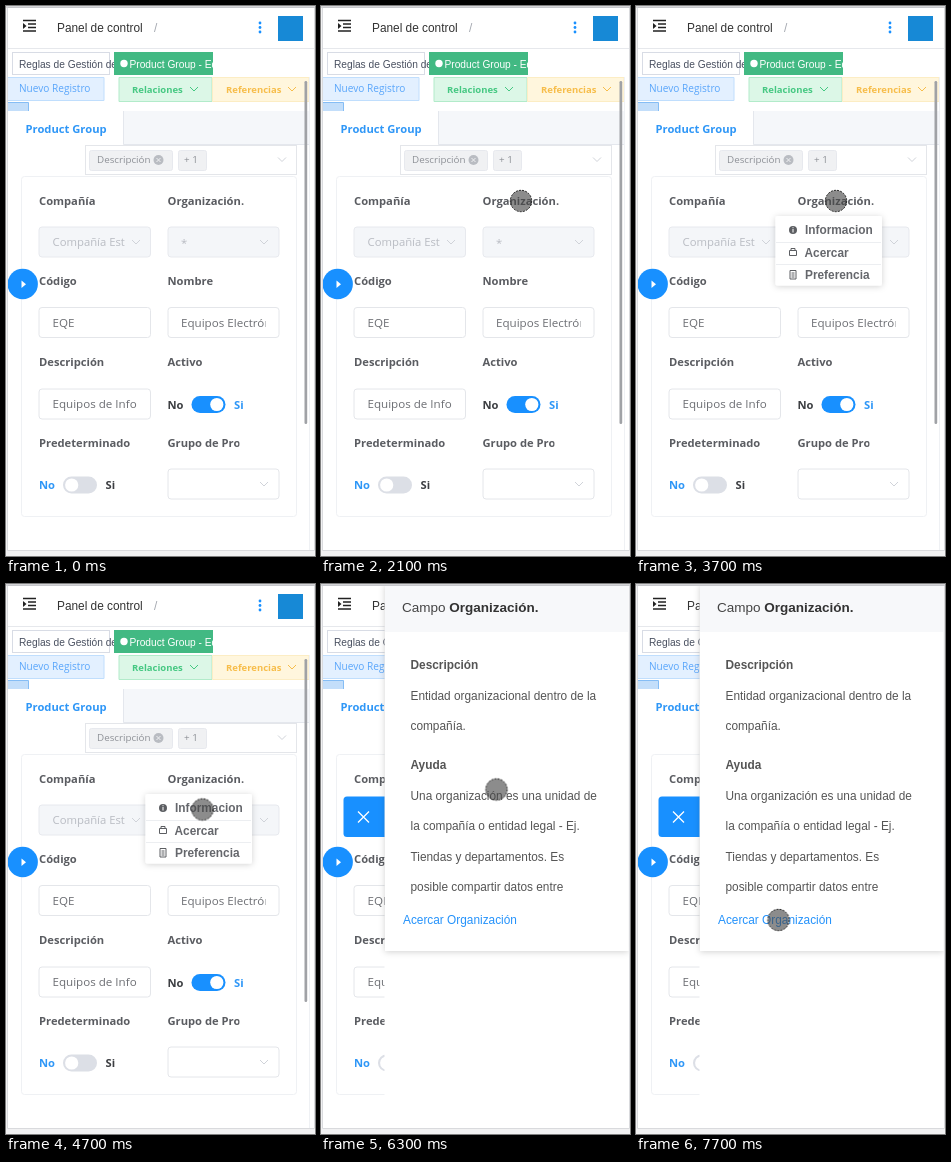
Recreate the animation shown at these times as an HTML page. Size 309 px wide and 550 px high, loop 8000 ms.

```html
<!DOCTYPE html>
<html lang="es">
<head>
<meta charset="utf-8">
<title>Panel de control</title>
<style>
html, body { margin: 0; width: 100%; height: 100%; overflow: hidden; background: #fff; }
svg { display: block; width: 309px; height: 550px; }
text { font: 11.85px "Liberation Sans", Arial, sans-serif; fill: #555; white-space: pre; }
.crumb { fill: #333; }
.page { font-size: 10.2px; fill: #495060; }
.page.on { fill: #fff; }
.bold { font-weight: 700; }
.menu text { font-weight: 700; fill: #65676c; }
.drawer .title { font-size: 13.5px; fill: #444; }
.drawer .link { fill: #2492fb; }

.form text { font: 11.6px "Open Sans", "Noto Sans", sans-serif; fill: #6c6e73; }
.form .label { font-size: 11.2px; font-weight: 700; fill: #5a5c61; }
.form .dark { fill: #3c3e42; }
.form .blue { fill: #2f97f7; }
.form .dim { font-size: 11.3px; fill: #b9bcc3; }
.form .chip { font-size: 9.8px; fill: #8d9096; }
.form .action { font-size: 9.5px; font-weight: 700; }
.box { fill: #fff; stroke: #e4e6ea; }
.off { fill: #f4f6f9; stroke: #e7e9ee; }
.tag { fill: #f0f1f3; stroke: #e7e9ee; }
.chev { fill: none; stroke: #d0d3d9; }

.menu, .drawer, .touch { animation: 8s step-end infinite; }
.menu { animation-name: menu; transform-origin: 192px 210px; }
.drawer { animation-name: drawer; }
.touch { animation-name: touch; }

@keyframes menu {
  0% { opacity: 0; transform: scaleY(.3); }
  41.25% { opacity: .2; transform: scaleY(.4); }
  42.5% { opacity: .6; transform: scaleY(.75); }
  43.75% { opacity: .9; transform: scaleY(.95); }
  45%, 67.5% { opacity: 1; transform: none; }
  68.75%, 100% { opacity: 0; transform: none; }
}
@keyframes drawer {
  0% { visibility: hidden; transform: translateX(290px); }
  68.75% { visibility: visible; transform: translateX(150px); }
  70% { visibility: visible; transform: translateX(35px); }
  71.25%, 100% { visibility: visible; transform: none; }
}
@keyframes touch {
  0% { opacity: 0; transform: translate(70px, 6px); }
  2.5% { opacity: 1; transform: translate(70px, 6px); }
  3.75% { transform: translate(118px, 60px); }
  5% { transform: translate(175px, 120px); }
  6.25% { transform: translate(204px, 168px); }
  7.5% { transform: translate(155px, 188px); }
  11.25% { transform: translate(160px, 198px); }
  12.5% { transform: translate(168px, 208px); }
  13.75% { transform: translate(177px, 204px); }
  15% { transform: translate(182px, 198px); }
  20% { transform: translate(183px, 199px); }
  21.25% { transform: translate(184px, 199px); }
  25% { transform: translate(194px, 196px); }
  26.25% { transform: translate(200px, 195px); }
  53.75% { transform: translate(200px, 199px); }
  55% { transform: translate(200px, 206px); }
  56.25% { transform: translate(199px, 214px); }
  57.5% { transform: translate(197px, 221px); }
  58.75% { transform: translate(196.5px, 225.500px); }
  78.75% { transform: translate(175.5px, 205.500px); }
  80% { transform: translate(160px, 150px); }
  81.25% { transform: translate(150px, 95px); }
  82.5% { transform: translate(142px, 55px); }
  83.75% { transform: translate(132px, 37px); }
  85% { transform: translate(120px, 55px); }
  86.25% { transform: translate(112px, 98px); }
  87.5% { transform: translate(109.5px, 148.500px); }
  88.75% { transform: translate(114px, 219px); }
  90% { transform: translate(150px, 240px); }
  91.25% { transform: translate(178px, 268px); }
  92.5% { transform: translate(180px, 298px); }
  93.75% { transform: translate(168px, 320px); }
  95% { transform: translate(152px, 333px); }
  96.25%, 100% { opacity: 1; transform: translate(142.5px, 336px); }
}
</style>
</head>
<body>
<svg viewBox="0 0 309 550">
  <defs>
    <clipPath id="screen"><path d="M2 2H308V544H2Z"/></clipPath>
    <clipPath id="tab1"><path d="M6 46H108V70H6Z"/></clipPath>
    <clipPath id="tab2"><path d="M108 46H207V70H108Z"/></clipPath>
    <clipPath id="left"><path d="M33 383H131V414H33Z"/></clipPath>
    <clipPath id="right"><path d="M162 301H259.500V332H162Z"/></clipPath>
    <clipPath id="group"><path d="M162 428H233.500V446H162Z"/></clipPath>
    <filter id="shade" x="-20%" y="-20%" width="140%" height="140%">
      <feDropShadow dx="0" dy="1" stdDeviation="3" flood-opacity=".18"/>
    </filter>
    <path id="chev" d="M-4 -2L0 2L4 -2"/>
  </defs>

  <rect width="309" height="550" fill="#f1f1f2"/>
  <path d="M1.500 1.500H308.500V544.500H1.500Z" fill="#fff" stroke="#d9dadd"/>
  <path d="M0 1H309" stroke="#b4b5b9"/>

  <g clip-path="url(#screen)">
    <!-- Header -->
    <path d="M17 14.500H30M22 18H30M22 21.500H30M17 25H30" stroke="#222" stroke-width="1.300"/>
    <path d="M17 17V23L20.500 20Z" fill="#222"/>
    <text class="crumb" x="51" y="26">Panel de control</text>
    <text x="148" y="26" style="fill:#a4a8b0">/</text>
    <g fill="#1890ff"><circle cx="254" cy="17" r="1.400"/><circle cx="254" cy="21.500" r="1.400"/><circle cx="254" cy="26" r="1.400"/></g>
    <rect x="272" y="10" width="25" height="25" fill="#1789d6"/>
    <path d="M2 42.500H308" stroke="#e6e8ec"/>

    <!-- Open pages -->
    <rect x="6.500" y="46.500" width="97" height="22" fill="#fff" stroke="#d8dce5"/>
    <text class="page" x="13" y="62" clip-path="url(#tab1)">Reglas de Gestión de</text>
    <rect x="108" y="46" width="99" height="23" fill="#42b983"/>
    <circle cx="118" cy="57.500" r="3.700" fill="#fff"/>
    <text class="page on" x="123.500" y="62" clip-path="url(#tab2)">Product Group - Equipos</text>

    <g class="form">
      <!-- Actions -->
      <path d="M0 71.500H98V94.500H0Z" fill="#e3f0ff" stroke="#c0defd"/>
      <text x="13" y="85.500" style="font-size:10.1px;fill:#5aa6fb">Nuevo Registro</text>
      <path d="M113 71.500H206V95.500H113Z" fill="#dcf7e7" stroke="#b2ebca"/>
      <text class="action" x="126" y="86.500" style="fill:#45c882">Relaciones</text>
      <use href="#chev" class="chev" x="188" y="83" style="stroke:#45c882"/>
      <path d="M206.500 71.500H303V95.500H206.500Z" fill="#fff6dd" stroke="#fcedc4"/>
      <text class="action" x="220" y="86.500" style="fill:#f7bd4a">Referencias</text>
      <use href="#chev" class="chev" x="286" y="83" style="stroke:#f7bd4a"/>
      <path d="M0 96.500H22.500V106H0Z" fill="#c3defa" stroke="#85bdf5"/>

      <!-- Form tab -->
      <path d="M2 105H303V139H2Z" fill="#f5f7fa"/>
      <path d="M2 105H117V139H2Z" fill="#fff"/>
      <path d="M117.500 105V138.500H303" fill="none" stroke="#e4e7ed"/>
      <text class="label blue" x="19.500" y="127">Product Group</text>

      <!-- Field filter -->
      <rect class="box" x="79.500" y="139.500" width="211" height="29"/>
      <rect class="tag" x="83.500" y="144.500" width="83" height="20" rx="2"/>
      <text class="chip" x="91" y="157">Descripción</text>
      <circle cx="152.500" cy="154" r="5" fill="#b9bcc2"/>
      <path d="M150.500 152L154.500 156M154.500 152L150.500 156" stroke="#f0f1f3"/>
      <rect class="tag" x="172.500" y="144.500" width="28" height="20" rx="2"/>
      <text class="chip" x="178" y="157">+ 1</text>
      <use href="#chev" class="chev" x="276" y="153.500"/>

      <!-- Fields -->
      <rect x="15.500" y="170.500" width="275" height="340" rx="3" fill="none" stroke="#eff1f4"/>
      <text class="label" x="33" y="199">Compañía</text>
      <text class="label" x="161.500" y="199">Organización.</text>
      <text class="label" x="33" y="279">Código</text>
      <text class="label" x="161.500" y="279">Nombre</text>
      <text class="label" x="33" y="360">Descripción</text>
      <text class="label" x="161.500" y="360">Activo</text>
      <text class="label" x="33" y="441">Predeterminado</text>
      <text class="label" x="161.500" y="441" clip-path="url(#group)">Grupo de Producto</text>

      <rect class="off" x="33" y="221" width="111.500" height="30" rx="3"/>
      <rect class="off" x="162" y="221" width="111" height="30" rx="3"/>
      <rect class="box" x="33" y="301.500" width="111.500" height="30" rx="3"/>
      <rect class="box" x="162" y="301.500" width="111" height="30" rx="3"/>
      <rect class="box" x="33" y="383" width="111.500" height="30" rx="3"/>
      <rect class="box" x="162" y="463" width="111" height="30" rx="3"/>
      <use href="#chev" class="chev" x="130" y="236"/>
      <use href="#chev" class="chev" x="258" y="236"/>
      <use href="#chev" class="chev" x="258" y="478"/>
      <text class="dim" x="46.500" y="240">Compañía Est</text>
      <text class="dim" x="175" y="241">*</text>
      <text x="46.500" y="321">EQE</text>
      <text x="175" y="321" clip-path="url(#right)">Equipos Electrónicos</text>
      <text x="46.500" y="402" clip-path="url(#left)">Equipos de Informática</text>

      <text class="label dark" x="161.500" y="403">No</text>
      <rect x="185.500" y="390" width="34" height="17" rx="8.500" fill="#1890ff"/>
      <circle cx="210.800" cy="398.500" r="6.600" fill="#fff"/>
      <text class="label blue" x="228" y="403">Si</text>
      <text class="label blue" x="33" y="483">No</text>
      <rect x="57" y="470.500" width="34" height="17" rx="8.500" fill="#dcdfe6"/>
      <circle cx="65.700" cy="479" r="6.600" fill="#fff"/>
      <text class="label dark" x="99.500" y="483">Si</text>
    </g>
    <path d="M303.500 71V544" stroke="#eff1f4"/>
    <rect x="298.500" y="75" width="2.700" height="343" rx="1.300" fill="#a0a2a6"/>

    <!-- Context menu -->
    <g class="menu">
      <rect x="139.500" y="210" width="106.500" height="69.500" rx="2" fill="#fff" filter="url(#shade)"/>
      <path d="M140 236.500H245M140 258.500H245" stroke="#eceef1"/>
      <circle cx="157" cy="224" r="4" fill="#5c5e62"/>
      <path d="M157 223V226.500M157 221.200V222.200" stroke="#fff"/>
      <path d="M153.500 244.500H160.500V249.500H153.500ZM155 244V242.500H159V244" fill="none" stroke="#5c5e62"/>
      <path d="M154 264.500H160V273H154ZM155.500 267H158.500M155.500 269H158.500M155.500 271H158.500" fill="none" stroke="#5c5e62"/>
      <text x="169" y="228">Informacion</text>
      <text x="168.500" y="250.500">Acercar</text>
      <text x="169" y="273">Preferencia</text>
    </g>

    <!-- Field help -->
    <g class="drawer">
      <path d="M64 212.500H26Q22.500 212.500 22.500 216V249.500Q22.500 253 26 253H64Z" fill="#1890ff"/>
      <path d="M37 227.500L48 238.500M48 227.500L37 238.500" stroke="#fff" stroke-width="1.300"/>
      <rect x="63.500" y="0" width="250" height="546" fill="#fff"/>
      <rect x="64" y="0" width="243.500" height="367" fill="#fff" filter="url(#shade)"/>
      <rect x="64" y="0" width="243.500" height="48" fill="#f7f8fa"/>
      <text class="title" x="81" y="27.500">Campo <tspan class="bold" fill="#333">Organización.</tspan></text>
      <text class="bold" x="89.500" y="85">Descripción</text>
      <text x="89.500" y="115.500">Entidad organizacional dentro de la</text>
      <text x="89.500" y="145.500">compañía.</text>
      <text class="bold" x="89.500" y="185">Ayuda</text>
      <text x="89.500" y="216">Una organización es una unidad de</text>
      <text x="89.500" y="246">la compañía o entidad legal - Ej.</text>
      <text x="89.500" y="277">Tiendas y departamentos. Es</text>
      <text x="89.500" y="307">posible compartir datos entre</text>
      <text class="link" x="82" y="339.500">Acercar Organización</text>
    </g>

    <circle cx="16.700" cy="278" r="15.200" fill="#1890ff"/>
    <path d="M15.500 274.500V282L20 278.250Z" fill="#fff"/>
  </g>

  <circle class="touch" r="10.700" fill="#464646" fill-opacity=".62" stroke="#222" stroke-dasharray="2 1.2"/>
</svg>
</body>
</html>
```
